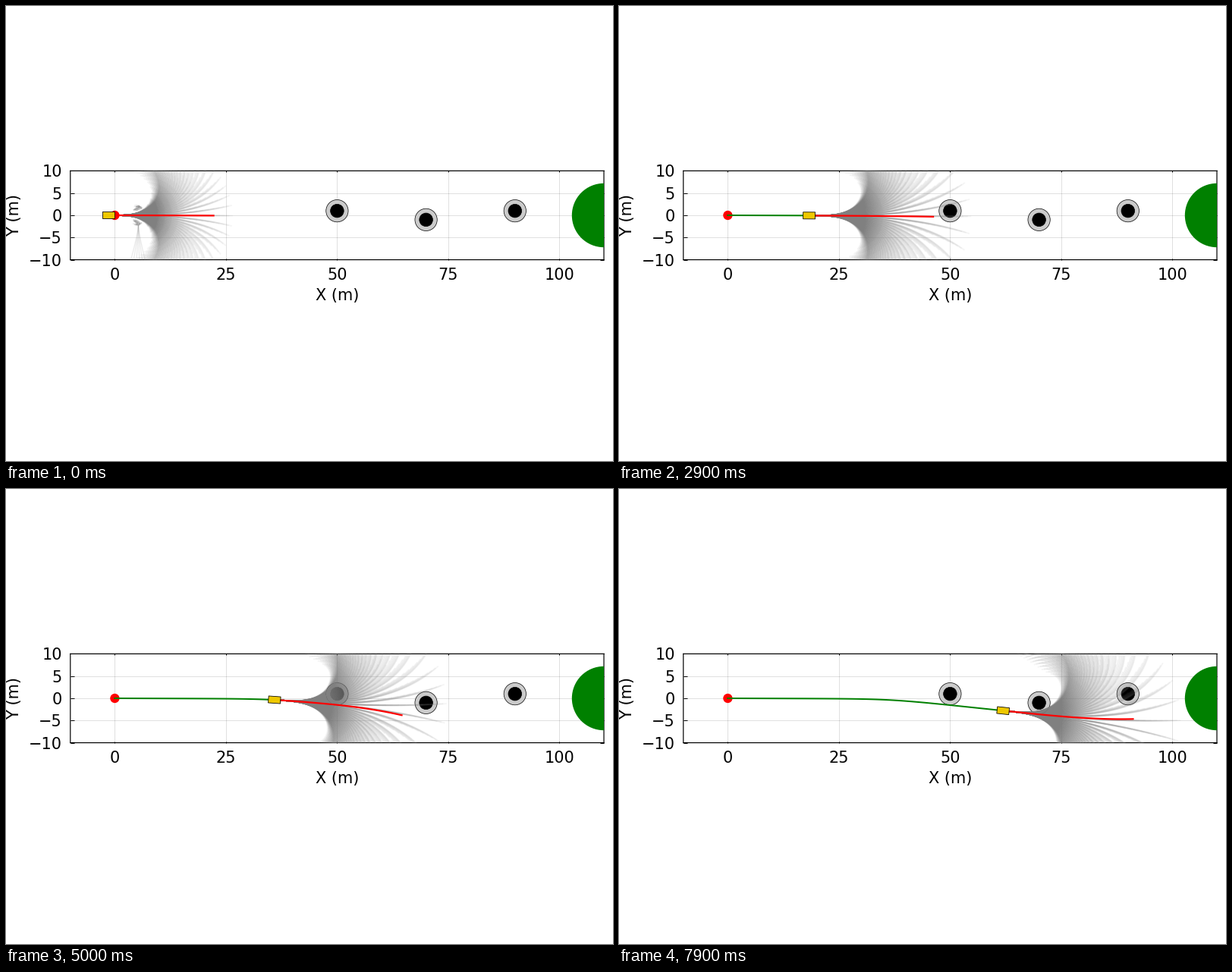
These frames come from a looping animation (800x600 px, 8 s). A matplotlib script:

```python
import matplotlib.pyplot as plt
import numpy as np
from matplotlib.animation import FuncAnimation
from matplotlib.collections import LineCollection
from matplotlib.patches import Circle, Polygon

FRAMES, STEP_MS = 80, 100
W, H, DPI = 800, 600, 100
PX = 72 / DPI                      # points per pixel

V_END, V_GAIN, TAU = 9.34, 4.25, 2.6
TIMES = np.linspace(0, 3, 31)
STEER_STEP, N_STEER = 0.0054, 23
YAW_MAX = 1.6
ACCELS = 2.5 - 4.4 * np.linspace(0, 1, 16) ** 1.2
CAR_LEN, CAR_HALF = 2.72, 0.77

plt.rcParams.update({"font.family": "DejaVu Sans", "font.size": 15,
                     "axes.unicode_minus": True})


def speed(t):
    return V_END - V_GAIN * np.exp(-t / TAU)


def car_x(t):
    return V_END * t - V_GAIN * TAU * (1 - np.exp(-t / TAU))


def lane(x):
    return -0.003 * x - 0.408 * np.log1p(np.exp((x - 36.5) / 4))


def heading(x):
    """The nose points slightly ahead along the lane."""
    return np.arctan(-0.003 - 0.102 / (1 + np.exp(-(x - 34.5) / 4)))


def running(f):
    """Trapezoid integral along the time axis, starting at zero."""
    dt = TIMES[1] - TIMES[0]
    out = np.zeros_like(f)
    out[:, 1:] = np.cumsum((f[:, 1:] + f[:, :-1]) * dt / 2, axis=1)
    return out


def rollout(x, y, yaw, v0, acc, rate):
    """Drive with constant acceleration and steadily growing steering."""
    acc, rate = np.atleast_1d(acc)[:, None], np.atleast_1d(rate)[:, None]
    v = np.maximum(v0 + acc * TIMES, 0)
    th = yaw + running(np.clip(rate * TIMES * v, -YAW_MAX, YAW_MAX))
    return np.stack([x + running(v * np.cos(th)),
                     y + running(v * np.sin(th))], axis=-1)


RATES, ACCS = (g.ravel() for g in np.meshgrid(
    np.arange(-N_STEER, N_STEER + 1) * STEER_STEP, ACCELS))


def fan(t):
    x = car_x(t)
    bias = 0.43 * STEER_STEP * np.clip((t - 2.9) / 1.3, 0, 1)
    return rollout(x, lane(x), heading(x), speed(t), ACCS, RATES + bias)


def plan(t):
    x, v = car_x(t), speed(t)
    rate = np.interp(t, [0, 3, 4.2, 5, 5.9, 6.1, 6.3, 7.9],
                     [0, -.0003, -.0038, -.0037, -.0045, -.078, -.002, .003])
    length = 28.3 - 5.9 * np.exp(-t / 2.2)
    return rollout(x, lane(x), heading(x), v, (length - 3 * v) / 4.5, rate)[0]


def start_curls():
    """Short stray strokes around the car at the very start."""
    rng = np.random.default_rng(4)
    u = np.linspace(0, 1, 10)
    strokes = []
    for side in (1, -1):
        for _ in range(16):
            x0, lift = rng.uniform(4.0, 4.9), rng.uniform(0.9, 1.4)
            bend = rng.uniform(0.3, 1.0)
            strokes.append(np.column_stack(
                [x0 + bend * np.sin(np.pi * u * 0.8) + 0.4 * u,
                 side * (lift + 0.9 * u)]))
        for _ in range(8):
            x0, y0 = rng.uniform(4.0, 4.8), rng.uniform(1.7, 2.2)
            strokes.append(np.column_stack(
                [x0 + 1.4 * u, side * (y0 + 0.3 * np.sin(3 * u) - 0.4 * u)]))
    for x1 in np.linspace(3.6, 6.8, 6):
        strokes.append(np.column_stack(
            [5.3 + (x1 - 5.3) * u ** 1.3, -2.2 - 7.8 * u]))
    return strokes


fig = plt.figure(figsize=(W / DPI, H / DPI), dpi=DPI, facecolor="white")
ax = fig.add_axes([84.8 / W, 1 - 334.6 / H, 703.2 / W, 117.2 / H])
ax.set(xlim=(-10, 110), ylim=(-10, 10),
       xticks=range(0, 101, 25), yticks=range(-10, 11, 5))
ax.set_axisbelow(True)
ax.grid(color="black", alpha=0.12, lw=PX)
ax.tick_params(direction="in", top=True, right=True, width=PX)
ax.tick_params(axis="x", length=2 * PX, pad=10.3 * PX)
ax.tick_params(axis="y", length=5 * PX, pad=10.8 * PX)
for spine in ax.spines.values():
    spine.set(linewidth=1.2 * PX, snap=False)
fig.text(436.4 / W, 1 - 387.7 / H, "X (m)", ha="center", va="baseline")
fig.text(17 / W, 1 - 276 / H, "Y (m)", rotation=90, rotation_mode="anchor",
         ha="center", va="baseline")


def disc(x, y, r, z, **style):
    ax.add_patch(Circle((x, y), r, zorder=z, **style))


disc(110, 0, 7.2, 3, fc="green", ec="none")
for ox, oy in ((50, 1), (70, -1), (90, 1)):
    disc(ox, oy, 2.5, 3, fc="#cbcbcb", ec="black", lw=0.7 * PX)
    disc(ox, oy, 1.5, 3.1, fc="black", ec="black", lw=0.7 * PX)
disc(0, 0, 1.05, 5, fc="red", ec="none")

rays = LineCollection([], colors="gray", linewidths=1.8 * PX, alpha=0.08,
                      zorder=4)
curls = LineCollection(start_curls(), colors="gray", linewidths=1.3 * PX,
                       alpha=0.16, zorder=4)
ax.add_collection(rays, autolim=False)
ax.add_collection(curls, autolim=False)
trail, = ax.plot([], [], color="green", lw=2 * PX, zorder=6)
route, = ax.plot([], [], color="red", lw=2.2 * PX, zorder=7,
                 solid_capstyle="butt")
car = Polygon(np.zeros((4, 2)), fc="#eec800", ec="black", lw=0.8 * PX,
              zorder=8, snap=False)
ax.add_patch(car)

BODY = np.array([[0, CAR_HALF], [0, -CAR_HALF],
                 [-CAR_LEN, -CAR_HALF], [-CAR_LEN, CAR_HALF]])


def draw(i):
    t = i * STEP_MS / 1000
    x = car_x(t)
    yaw = heading(x)
    c, s = np.cos(yaw), np.sin(yaw)
    rays.set_segments(fan(t))
    curls.set_visible(i == 0)
    xs = np.linspace(0, x, 120)
    trail.set_data(xs, lane(xs))
    route.set_data(*plan(t).T)
    car.set_xy(BODY @ np.array([[c, s], [-s, c]]) + (x, lane(x)))
    return rays, curls, trail, route, car


anim = FuncAnimation(fig, draw, frames=FRAMES, interval=STEP_MS,
                     repeat=True, repeat_delay=0, blit=False)
plt.show()
```
